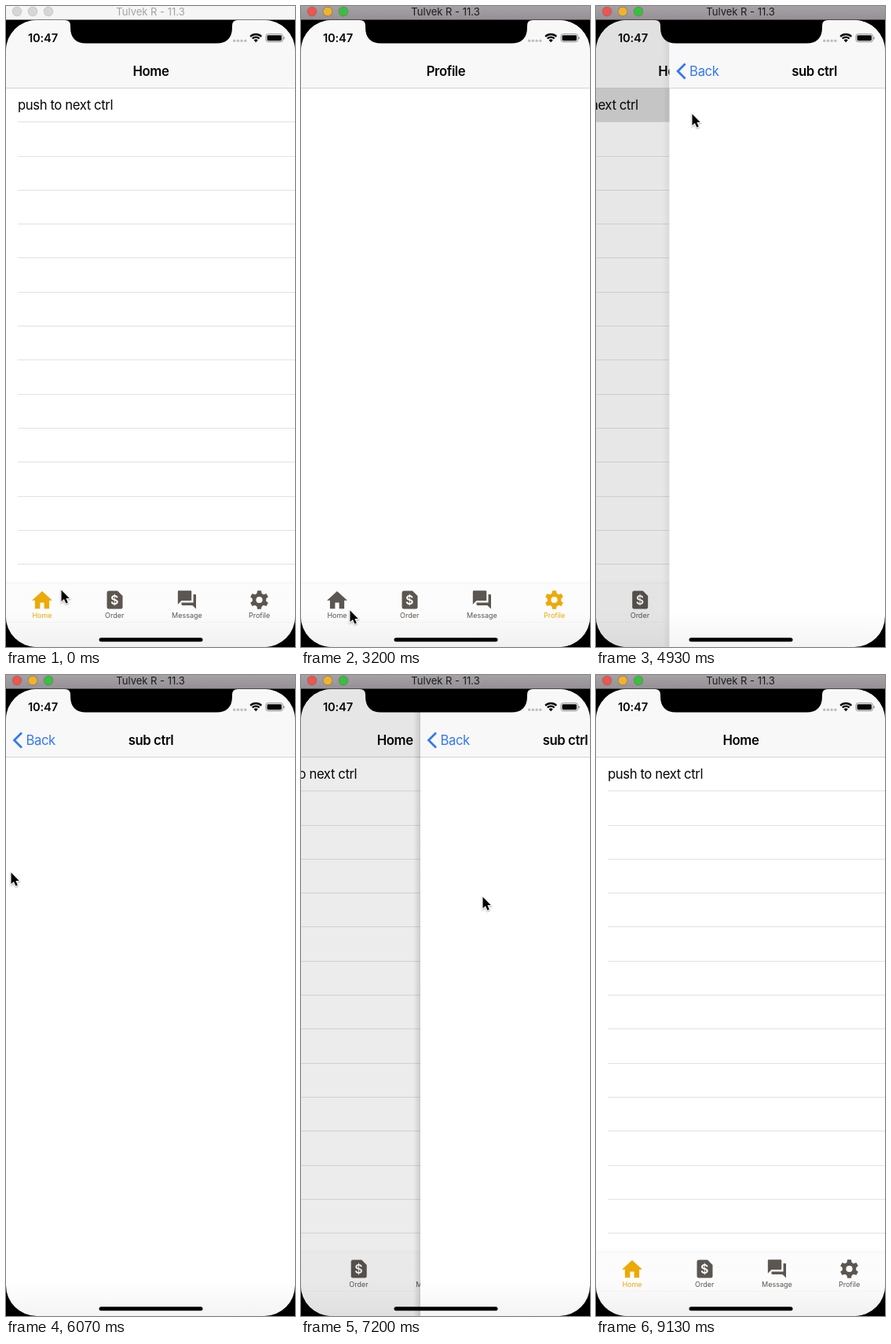
An HTML page with a canvas that plays this animation: 368 px wide and 816 px high, repeating every 9190 ms.

```html
<!DOCTYPE html>
<html lang="en">
<head>
<meta charset="utf-8">
<title>Tab bar demo</title>
<style>
html, body { margin: 0; width: 100%; height: 100%; overflow: hidden; background: #000; }
canvas { display: block; width: 368px; height: 816px; }
</style>
</head>
<body>
<canvas id="stage" width="368" height="816"></canvas>
<script>
const ctx = document.getElementById('stage').getContext('2d');
const W = 368, H = 816, TOP = 18, LOOP = 9190, STEP = 1000 / 15;
const ACCENT = '#eda905', IDLE = '#5b564f', BLUE = '#3478f6', INK = '#050505';
const TABS = ['Home', 'Order', 'Message', 'Profile'];
const TAB_TIMES = [[0, 0], [600, 1], [1470, 2], [2270, 3], [3460, 0]];
const PUSH = 4728, PRESS = 4650, DRAG = 6790, RELEASE = 7400;

// [time, x, y] of the pointer tip
const POINTER = [
  [0, 70, 743], [70, 70, 743], [400, 137, 757], [740, 137, 757],
  [1200, 267, 764], [1370, 257, 762], [1650, 257, 762], [2160, 324, 764],
  [2480, 324, 766], [2840, 205, 782], [3200, 62, 769], [3370, 48, 763],
  [3600, 48, 763], [4330, 120, 141], [4600, 122, 137], [5130, 122, 137],
  [5800, 8, 249], [6070, 6, 251], [6740, 6, 255], [6950, 75, 267],
  [7200, 231, 282], [7420, 325, 290], [7800, 376, 300]
];
// [time, x] of the upper page while it is dragged away
const SWIPE = [[DRAG, 0], [7000, 32], [7200, 152], [RELEASE, 272]];

const homeIcon = new Path2D('M10 20v-6h4v6h5v-8h3L12 3 2 12h3v8z');
const chatIcon = new Path2D('M21 6h-2v9H6v2c0 .55.45 1 1 1h11l4 4V7c0-.55-.45-1-1-1z' +
  'M17 12V3c0-.55-.45-1-1-1H3c-.55 0-1 .45-1 1v14l4-4h10c.55 0 1-.45 1-1z');
const billIcon = new Path2D('M131 744.5h11l6.5 6.5v14q0 2.5-2.5 2.5h-15q-2.5 0-2.5-2.5v-18q0-2.5 2.5-2.5z');
const arrow = new Path2D('M0 0V14.6L3.4 11.4L5.9 17L8.3 16L5.9 10.5H10.3Z');

function screenShape() {
  const p = new Path2D();
  p.roundRect(0, TOP, W, H - TOP, 39);
  return p;
}
const screen = screenShape();
const notch = new Path2D('M75 17H295V18Q288 18 288 25V27Q288 47.5 268 47.5H102Q82 47.5 82 27V25Q82 18 75 18Z');

function track(keys, t) {
  if (t <= keys[0][0]) return keys[0].slice(1);
  for (let i = 1; i < keys.length; i++) {
    const a = keys[i - 1], b = keys[i];
    if (t <= b[0]) {
      const k = (t - a[0]) / (b[0] - a[0]);
      return a.slice(1).map((v, j) => v + (b[j + 1] - v) * k);
    }
  }
  return keys[keys.length - 1].slice(1);
}

function box(x, y, w, h, color) {
  ctx.fillStyle = color;
  ctx.fillRect(x, y, w, h);
}

function disc(x, y, r, color) {
  ctx.fillStyle = color;
  ctx.beginPath();
  ctx.arc(x, y, r, 0, Math.PI * 2);
  ctx.fill();
}

function pill(x, y, w, h, r, color) {
  ctx.fillStyle = color;
  ctx.beginPath();
  ctx.roundRect(x, y, w, h, r);
  ctx.fill();
}

function text(str, x, y, size, { color = INK, weight = 400, align = 'left', gap = 0 } = {}) {
  ctx.font = `${weight} ${size}px Inter, sans-serif`;
  ctx.letterSpacing = gap + 'px';
  ctx.textAlign = align;
  ctx.fillStyle = color;
  ctx.fillText(str, x, y);
}

function iconAt(path, x, y, scale, color) {
  ctx.save();
  ctx.translate(x, y);
  ctx.scale(scale, scale);
  ctx.fillStyle = color;
  ctx.fill(path);
  ctx.restore();
}

function gear(x, y, color) {
  ctx.save();
  ctx.translate(x, y);
  const p = new Path2D();
  p.arc(0, 0, 8.8, 0, Math.PI * 2);
  p.closePath();
  ctx.fillStyle = color;
  ctx.fill(p);
  for (let i = 0; i < 6; i++) {
    ctx.fill(new Path2D('M-3.3 -7L-2.4 -11.7H2.4L3.3 -7Z'));
    ctx.rotate(Math.PI / 3);
  }
  disc(0, 0, 4.1, '#fcfcfc');
  ctx.restore();
}

function navBar(title) {
  box(0, TOP, W, 86, '#f8f8f8');
  box(0, 104, W, 1, '#d2d2d3');
  text(title, 184.5, 89, 16.7, { weight: 600, align: 'center', gap: -0.4 });
}

function bottomFade() {
  const g = ctx.createLinearGradient(0, 770, 0, H);
  g.addColorStop(0, 'rgba(0,0,0,0)');
  g.addColorStop(1, 'rgba(0,0,0,.045)');
  box(0, 770, W, H - 770, g);
}

function tabBar(active) {
  const g = ctx.createLinearGradient(0, 731, 0, 737);
  g.addColorStop(0, 'rgba(0,0,0,0)');
  g.addColorStop(1, 'rgba(0,0,0,.045)');
  box(0, 731, W, 5, g);
  box(0, 736, W, H - 736, 'rgba(252,252,252,.94)');
  box(0, 784, W, 1, '#f6f6f6');
  const tint = i => i === active ? ACCENT : IDLE;
  iconAt(homeIcon, 30.4, 741.2, 1.3, tint(0));
  iconAt(billIcon, 0, 0, 1, tint(1));
  text('$', 138.3, 761.8, 16, { color: '#fff', weight: 600, align: 'center' });
  iconAt(chatIcon, 216.5, 742, 1.16, tint(2));
  gear(322.5, 756, tint(3));
  TABS.forEach((name, i) =>
    text(name, 46 + 92.2 * i, 779, 9, { color: tint(i), align: 'center' }));
}

function tabPage(active, pressed) {
  box(0, TOP, W, H - TOP, '#fff');
  if (active === 0) {
    if (pressed) box(0, 105, W, 43, '#d9d9d9');
    text('push to next ctrl', 15, 132, 16.7, { gap: -0.4 });
    for (let i = 0; i < 16; i++) box(15, Math.round(147.2 + 43.3 * i), W - 15, 1, '#e2e2e4');
  }
  navBar(TABS[active]);
  tabBar(active);
  bottomFade();
}

function subPage() {
  box(0, TOP, W, H - TOP, '#fff');
  navBar('sub ctrl');
  ctx.strokeStyle = BLUE;
  ctx.lineWidth = 2.8;
  ctx.stroke(new Path2D('M20 73.5L10.5 83L20 92.5'));
  text('Back', 25.5, 89, 16.7, { color: BLUE, gap: -0.4 });
  bottomFade();
}

function statusBar() {
  text('10:47', 47, 46, 14.7, { weight: 600, align: 'center', gap: -0.2 });
  for (let i = 0; i < 4; i++) disc(290.7 + 4.7 * i, 44.2, 1.7, '#bdbdbd');
  ctx.strokeStyle = INK;
  ctx.lineWidth = 2.3;
  for (const r of [10, 6.3]) {
    ctx.beginPath();
    ctx.arc(318.2, 46, r, -Math.PI * 0.75, -Math.PI * 0.25);
    ctx.stroke();
  }
  ctx.fillStyle = INK;
  ctx.fill(new Path2D('M318.2 46.2L315.6 43.4Q318.2 41.2 320.8 43.4Z'));
  ctx.strokeStyle = '#8f8f8f';
  ctx.lineWidth = 1;
  ctx.beginPath();
  ctx.roundRect(331, 35.7, 21.5, 10, 2.6);
  ctx.stroke();
  pill(332.5, 37.2, 18.5, 7, 1.4, INK);
  pill(353.4, 39.2, 1.4, 3.2, 0.7, '#8f8f8f');
}

function windowBar(focused) {
  const g = ctx.createLinearGradient(0, 0, 0, TOP);
  g.addColorStop(0, focused ? '#a5a1a5' : '#f6f6f6');
  g.addColorStop(1, focused ? '#959095' : '#f5f5f5');
  box(0, 0, W, TOP - 0.5, g);
  const lights = focused ? ['#f0544c', '#f2b32a', '#35c23c'] : ['#d6d6d6', '#d6d6d6', '#d6d6d6'];
  lights.forEach((color, i) => {
    disc(14 + 20 * i, 7, 6.2, focused ? 'rgba(70,40,30,.35)' : '#c2c2c2');
    disc(14 + 20 * i, 7, 5.6, color);
  });
  text('Tulvek R - 11.3', 184, 12, 13, { color: focused ? '#1c1b1c' : '#a3a3a3', align: 'center' });
}

function pointer(x, y) {
  ctx.save();
  ctx.translate(x + 0.5, y + 0.5);
  ctx.shadowColor = 'rgba(0,0,0,.35)';
  ctx.shadowBlur = 2;
  ctx.shadowOffsetY = 1;
  ctx.strokeStyle = '#fff';
  ctx.lineWidth = 2;
  ctx.stroke(arrow);
  ctx.shadowColor = 'transparent';
  ctx.fillStyle = '#000';
  ctx.fill(arrow);
  ctx.restore();
}

function subOffset(t) {
  if (t < PUSH) return W;
  if (t < DRAG) {
    const x = W * Math.exp((PUSH - t) / 150);
    return x < 0.7 ? 0 : x;
  }
  if (t < RELEASE) return track(SWIPE, t)[0];
  const left = (W - SWIPE[3][1]) * Math.exp((RELEASE - t) / 90);
  return left < 1 ? W : W - left;
}

function draw(t) {
  const active = TAB_TIMES.filter(k => k[0] <= t).pop()[1];
  const x = subOffset(t), cover = 1 - x / W;

  box(0, 0, W, H, '#000');
  ctx.save();
  ctx.clip(screen);
  if (cover < 1) {
    ctx.save();
    ctx.translate(-0.3 * W * cover, 0);
    tabPage(active, t >= PRESS && t < DRAG);
    ctx.restore();
  }
  if (cover > 0) {
    box(0, TOP, x, H - TOP, `rgba(0,0,0,${0.125 * cover})`);
    const g = ctx.createLinearGradient(x - 9, 0, x, 0);
    g.addColorStop(0, 'rgba(0,0,0,0)');
    g.addColorStop(1, `rgba(0,0,0,${t < DRAG ? 0.06 : 0.14})`);
    box(x - 9, TOP, 9, H - TOP, g);
    ctx.save();
    ctx.translate(x, 0);
    subPage();
    ctx.restore();
  }
  statusBar();
  pill(118.5, 804.2, 132, 5, 2.5, '#000');
  ctx.restore();

  ctx.fillStyle = '#000';
  ctx.fill(notch);
  windowBar(t >= 600);
  const [px, py] = track(POINTER, t);
  if (px < W) pointer(px, py);
}

function tick() {
  const t = performance.now() % LOOP;
  draw(Math.floor((t + 4) / STEP) * STEP);
  requestAnimationFrame(tick);
}
tick();
</script>
</body>
</html>
```
